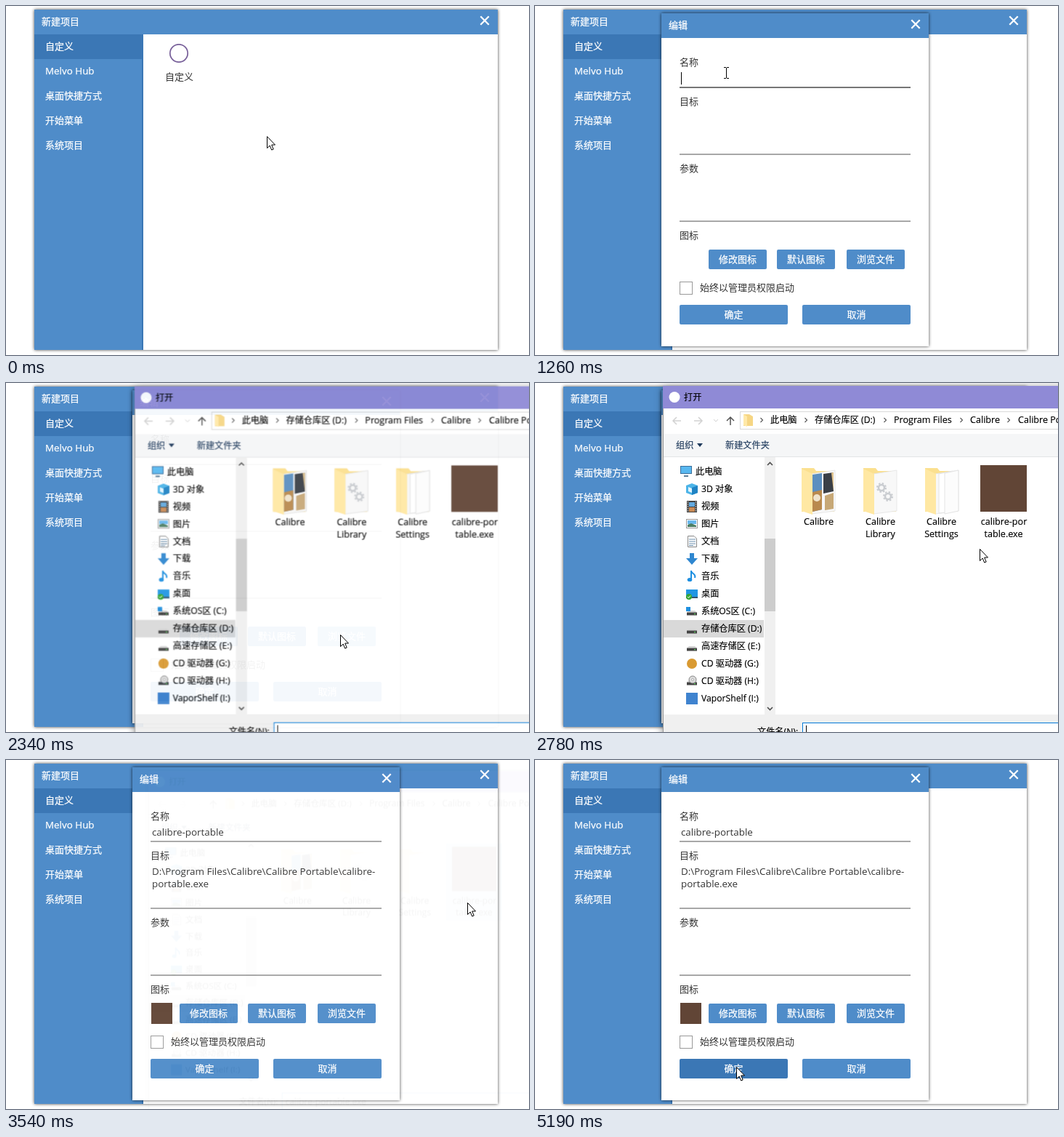
These frames come from a looping animation (720x480 px, 5290 ms). An HTML page:

```html
<!DOCTYPE html>
<html lang="zh-CN">
<head>
<meta charset="utf-8">
<title>新建项目</title>
<style>
html, body { margin: 0; width: 100%; height: 100%; overflow: hidden; background: #fff; }
svg { display: block; width: 720px; height: 480px; }
text { font: 13px "Open Sans", "Noto Sans CJK SC", "Noto Sans CJK", sans-serif; fill: #333; white-space: pre; }
.en { font-size: 13.4px; }
.light text, text.light { fill: #fff; stroke: #fff; stroke-width: .25px; }
.mid text, text.mid { text-anchor: middle; }
.win { fill: #fff; filter: drop-shadow(0 0 2px rgba(0,0,0,.75)); }
.blue { fill: #4f8cc9; }
.dark { fill: #3b77b5; }
.line { fill: #a8a8a8; }
.x { stroke: #fff; stroke-width: 2.3; fill: none; }

#picker text { font-size: 12.2px; fill: #000; stroke: #000; stroke-width: .15px; }
#picker .en { font-size: 12.6px; }
#picker .cmd { fill: #1e395b; stroke: #1e395b; }
.frame { fill: #fff; filter: drop-shadow(0 2px 6px rgba(0,0,0,.45)); }
.chev { fill: none; stroke: #555; stroke-width: 1.1; }

/* 5290 ms loop, every change is a hard step */
.a { animation: 5290ms step-end infinite; }
#cursor { animation-name: move; }
#arrow { animation-name: arrow; }
#beam { animation-name: beam; }
#tile { animation-name: tile; }
#edit { animation-name: edit; }
#caret { animation-name: caret; }
#lineName { animation-name: lineName; }
#lineGoal { animation-name: lineGoal; }
#lineArgs { animation-name: lineArgs; }
#browse { animation-name: browse; }
#reset { animation-name: reset; }
#ok { animation-name: ok; }
#filled { animation-name: filled; }
#picker { animation-name: picker; transform-origin: 633px 253px; }
#pick { animation-name: pick; }
#fileName { animation-name: fileName; }
#fileCaret { animation-name: fileCaret; }

@keyframes move {
  0% { transform: translate(359px,179px); }
  5.25% { transform: translate(350px,169px); }
  7.33% { transform: translate(318px,140px); }
  9.22% { transform: translate(285px,110px); }
  11.3% { transform: translate(268px,96px); }
  13.38% { transform: translate(263px,92px); }
  25.67% { transform: translate(268px,104px); }
  27.75% { transform: translate(305px,165px); }
  29.83% { transform: translate(362px,240px); }
  31.9% { transform: translate(420px,322px); }
  33.8% { transform: translate(445px,338px); }
  35.88% { transform: translate(455px,344px); }
  37.96% { transform: translate(459px,346px); }
  40.03% { transform: translate(460px,346px); }
  48.35% { transform: translate(490px,322px); }
  50.43% { transform: translate(560px,270px); }
  52.51% { transform: translate(612px,228px); }
  54.78% { transform: translate(630px,204px); }
  57.05% { transform: translate(635px,196px); }
  75.2% { transform: translate(596px,226px); }
  77.27% { transform: translate(505px,284px); }
  79.35% { transform: translate(440px,325px); }
  81.43% { transform: translate(398px,352px); }
  83.51% { transform: translate(366px,388px); }
  85.59% { transform: translate(322px,404px); }
  87.67% { transform: translate(290px,416px); }
  89.56%, 100% { transform: translate(277px,422px); }
}
@keyframes arrow {
  0%, 31.9%, 79.35%, 100% { opacity: 1; }
  17.35%, 77.27% { opacity: 0; }
}
@keyframes beam {
  0%, 31.9%, 79.35%, 100% { opacity: 0; }
  17.35%, 77.27% { opacity: 1; }
}
@keyframes tile { 0%, 100% { opacity: 0; } 9.22% { opacity: 1; } }
@keyframes edit { 0% { opacity: 0; } 15.27% { opacity: .6; } 17.35%, 100% { opacity: 1; } }
@keyframes caret { 0%, 33.8%, 100% { opacity: 0; } 23.78% { opacity: 1; } }
@keyframes lineName { 0%, 27.75%, 100% { fill: #a8a8a8; } 17.35% { fill: #767676; } }
@keyframes lineGoal { 0%, 29.83%, 100% { fill: #a8a8a8; } 27.75% { fill: #767676; } }
@keyframes lineArgs { 0%, 31.9%, 79.35%, 100% { fill: #a8a8a8; } 29.83%, 77.27% { fill: #767676; } }
@keyframes browse { 0%, 65.18%, 100% { fill: #4f8cc9; } 33.8% { fill: #62a0df; } }
@keyframes reset { 0%, 85.59%, 100% { fill: #4f8cc9; } 81.43% { fill: #62a0df; } 83.51% { fill: #5996d4; } }
@keyframes ok { 0% { fill: #4f8cc9; } 87.67% { fill: #62a0df; } 98.07%, 100% { fill: #3b77b5; } }
@keyframes filled { 0% { opacity: 0; } 65.18%, 100% { opacity: 1; } }
@keyframes picker {
  0%, 69.15%, 100% { opacity: 0; transform: scale(.955); }
  41.92% { opacity: .5; transform: scale(.96); }
  44.2% { opacity: .945; transform: scale(.998); }
  46.46% { opacity: 1; transform: none; }
  65.18% { opacity: .6; transform: scale(.985); }
  66.88% { opacity: .04; transform: scale(.9555); }
}
@keyframes pick {
  0% { fill: transparent; stroke: transparent; }
  54.78% { fill: #e5f3ff; stroke: #e5f3ff; }
  61.02%, 100% { fill: #cce8ff; stroke: #99d1ff; }
}
@keyframes fileName { 0% { opacity: 0; } 61.02%, 100% { opacity: 1; } }
@keyframes fileCaret { 0% { opacity: 1; } 61.02%, 100% { opacity: 0; } }
</style>
</head>
<body>
<svg viewBox="0 0 720 480">
  <defs>
    <g id="folder">
      <path d="M0 1H17L20 5H45V61H0Z" fill="#fbe08f"/>
      <path d="M14 9L46 4V60L14 64Z" fill="#f8f8f8" stroke="#e2e2e2" stroke-width=".8"/>
    </g>
    <path id="flap" d="M0 2L15 9V65L0 60Z" fill="#ffe8a3"/>
    <g id="drive">
      <path d="M3 7H11L14 9.500H0Z" fill="#d4d4d4"/>
      <rect y="9.500" width="14" height="4" fill="#444"/>
      <rect x="10" y="11" width="2" height="1.200" fill="#5fd35f"/>
    </g>
    <path id="chev" class="chev" d="M-1.500 -3L1.500 0L-1.500 3"/>
    <path id="cross" class="x" d="M-5.700 -5.700L5.700 5.700M5.700 -5.700L-5.700 5.700"/>
  </defs>

  <!-- main window -->
  <rect class="win" x="39" y="5" width="638" height="468"/>
  <rect class="blue" x="39" y="5" width="638" height="34"/>
  <rect class="blue" x="39" y="39" width="148" height="434"/>
  <rect class="dark" x="187" y="39" width="2" height="434"/>
  <rect class="dark" x="39" y="39" width="150" height="34"/>
  <use href="#cross" x="659" y="20"/>
  <g class="light">
    <text x="49" y="25.500">新建项目</text>
    <text x="54" y="60">自定义</text>
    <text x="54" y="94" class="en">Melvo Hub</text>
    <text x="54" y="128">桌面快捷方式</text>
    <text x="54" y="162">开始菜单</text>
    <text x="54" y="196">系统项目</text>
  </g>
  <rect id="tile" class="a" x="189" y="39" width="98" height="74" fill="#e5eef7"/>
  <circle cx="238" cy="65" r="12.200" fill="#fff" stroke="#775f99" stroke-width="1.700"/>
  <text class="mid" x="238.500" y="102">自定义</text>

  <!-- edit dialog -->
  <g id="edit" class="a">
    <rect class="win" x="174" y="10" width="368" height="458"/>
    <rect class="blue" x="174" y="10" width="368" height="34"/>
    <text class="light" x="184" y="30.500">编辑</text>
    <use href="#cross" x="524" y="25"/>
    <text x="199" y="82">名称</text>
    <text x="199" y="136">目标</text>
    <text x="199" y="228">参数</text>
    <text x="199" y="320">图标</text>
    <rect id="lineName" class="line a" x="199" y="111" width="318" height="2"/>
    <rect id="lineGoal" class="line a" x="199" y="203" width="318" height="2"/>
    <rect id="lineArgs" class="line a" x="199" y="295" width="318" height="2"/>
    <rect id="caret" class="a" x="201" y="91" width="1" height="17"/>
    <g id="filled" class="a">
      <text class="en" x="201" y="104">calibre-portable</text>
      <text class="en" x="201" y="158">D:\Program Files\Calibre\Calibre Portable\calibre-</text>
      <text class="en" x="201" y="175">portable.exe</text>
      <rect x="200" y="334" width="29" height="29" fill="#614536"/>
    </g>
    <g class="blue">
      <rect x="239" y="335" width="80" height="27" rx="2"/>
      <rect id="reset" class="a" x="333" y="335" width="80" height="27" rx="2"/>
      <rect id="browse" class="a" x="429" y="335" width="80" height="27" rx="2"/>
      <rect id="ok" class="a" x="199" y="411" width="149" height="27" rx="2"/>
      <rect x="368" y="411" width="149" height="27" rx="2"/>
    </g>
    <g class="light mid">
      <text x="279" y="353">修改图标</text>
      <text x="373" y="353">默认图标</text>
      <text x="469" y="353">浏览文件</text>
      <text x="273.500" y="429">确定</text>
      <text x="442.500" y="429">取消</text>
    </g>
    <rect x="199.500" y="379.500" width="17" height="17" fill="#fff" stroke="#999"/>
    <text x="227" y="392">始终以管理员权限启动</text>
  </g>

  <!-- file picker -->
  <g id="picker" class="a">
    <rect class="frame" x="176" y="4" width="914" height="498"/>
    <rect x="176" y="4" width="914" height="31" fill="#8f8ad6"/>
    <circle cx="192" cy="19.500" r="7.500" fill="#fff"/>
    <text x="205" y="24">打开</text>

    <g fill="none" stroke="#d2d2d2" stroke-width="1.500">
      <path d="M201 52H190M195 47L190 52L195 57M219 52H230M225 47L230 52L225 57"/>
      <path d="M246 50L249 53L252 50" stroke-width="1"/>
      <path d="M269 58V47M264 52L269 47L274 52" stroke="#555"/>
    </g>
    <rect x="282.500" y="39.500" width="640" height="24" fill="#fff" stroke="#d9d9d9"/>
    <path d="M287 43H295L300 46V59H287Z" fill="#f6d684"/>
    <path d="M287 43L292 46V60L287 58Z" fill="#ffe9a8"/>
    <use href="#chev" x="312" y="51"/>
    <use href="#chev" x="373" y="51"/>
    <use href="#chev" x="482" y="51"/>
    <use href="#chev" x="587" y="51"/>
    <use href="#chev" x="652" y="51"/>
    <text x="324" y="55">此电脑</text>
    <text x="385" y="55">存储仓库区 (D:)</text>
    <text x="494" y="55" class="en">Program Files</text>
    <text x="599" y="55" class="en">Calibre</text>
    <text x="665" y="55" class="en">Calibre Portable</text>

    <rect x="176" y="70" width="914" height="31" fill="#f5f6f7"/>
    <rect x="176" y="101" width="914" height="1" fill="#e3e4e6"/>
    <text x="194" y="90" class="cmd">组织</text>
    <path d="M223 83H231L227 88Z" fill="#1e395b"/>
    <text x="262" y="90" class="cmd">新建文件夹</text>

    <rect x="176" y="326" width="139" height="24" fill="#d9d9d9"/>
    <rect x="316" y="102" width="15" height="354" fill="#f0f0f0"/>
    <rect x="316" y="214" width="15" height="100" fill="#cdcdcd"/>
    <path d="M320 113L323.500 109.500L327 113M320 446L323.500 449.500L327 446" fill="none" stroke="#505050" stroke-width="1.600"/>

    <!-- tree icons -->
    <rect x="200.500" y="114.500" width="15" height="10" fill="#58b8f0" stroke="#3b6f9c"/>
    <path d="M205 127H211V129H205Z" fill="#5d7f99"/>
    <path d="M208 141L216 138L224 141V151L216 154L208 151Z" fill="#4cb4e8"/>
    <path d="M216 144L224 141V151L216 154Z" fill="#1f83c4"/>
    <path d="M211 143L216 145V151L211 149Z" fill="#e3f5ff"/>
    <rect x="209" y="162" width="14" height="16" fill="#444"/>
    <path d="M210.500 163V178M221.500 163V178" stroke="#ddd" stroke-dasharray="1.500 1.500"/>
    <rect x="212" y="164" width="8" height="6" fill="#62a9df"/>
    <rect x="212" y="171" width="8" height="6" fill="#c98a55"/>
    <rect x="208.500" y="187.500" width="15" height="12" fill="#fff" stroke="#999"/>
    <rect x="210" y="189" width="12" height="5" fill="#69b7ec"/>
    <path d="M210 198V195L215 193L222 196V198Z" fill="#4d7f64"/>
    <path d="M210.500 210.500H219L222.500 214V225.500H210.500Z" fill="#fff" stroke="#888"/>
    <path d="M212 215H221M212 218H221M212 221H221M212 223.500H218" stroke="#6b8fae"/>
    <path d="M213 234H219V241H224L216 250L208 241H213Z" fill="#2f87d0"/>
    <path d="M215 258V270M215 259C217 263 222 263 220 268" stroke="#1d8fe0" stroke-width="2" fill="none"/>
    <ellipse cx="213" cy="270.500" rx="3.300" ry="2.600" fill="#1d8fe0"/>
    <rect x="208" y="284" width="16" height="12" fill="#2196e3"/>
    <rect x="208" y="294" width="16" height="2" fill="#33546e"/>
    <circle cx="212" cy="294" r="4" fill="#37a637"/>
    <path d="M210 294L211.500 295.500L214 292.500" stroke="#fff" fill="none"/>
    <use href="#drive" x="209" y="306"/>
    <rect x="208" y="308" width="6" height="6" fill="#1e90e0"/>
    <use href="#drive" x="209" y="331"/>
    <use href="#drive" x="209" y="355"/>
    <circle cx="216" cy="386" r="7" fill="#d99a32"/>
    <use href="#drive" x="209" y="402"/>
    <circle cx="217" cy="408" r="5" fill="#dcdcdc" stroke="#888"/>
    <circle cx="217" cy="408" r="1.500" fill="#fff" stroke="#999" stroke-width=".7"/>
    <rect x="208" y="426" width="16" height="16" fill="#3f83cf"/>

    <text x="221" y="126">此电脑</text>
    <text x="229" y="150">3D 对象</text>
    <text x="229" y="174">视频</text>
    <text x="229" y="198">图片</text>
    <text x="229" y="222">文档</text>
    <text x="229" y="246">下载</text>
    <text x="229" y="270">音乐</text>
    <text x="229" y="294">桌面</text>
    <text x="229" y="318">系统OS区 (C:)</text>
    <text x="229" y="342">存储仓库区 (D:)</text>
    <text x="229" y="366">高速存储区 (E:)</text>
    <text x="229" y="390">CD 驱动器 (G:)</text>
    <text x="229" y="414">CD 驱动器 (H:)</text>
    <text x="229" y="438">VaporShelf (I:)</text>

    <!-- files -->
    <use href="#folder" x="367" y="116"/>
    <path d="M382 126L395 124V174L382 177Z" fill="#5b8fc0"/>
    <path d="M382 150L395 147V174L382 177Z" fill="#b98a4e"/>
    <circle cx="388" cy="158" r="5" fill="#efe3cb"/>
    <path d="M397 125L411 123V149L397 152Z" fill="#3a3f47"/>
    <path d="M399 155L411 151V173L399 175Z" fill="#c7a877"/>
    <path d="M405 124L408 123.500L411 149V123L405 124Z" fill="#e3c58e"/>
    <use href="#flap" x="367" y="116"/>
    <use href="#folder" x="452" y="116"/>
    <g fill="none" stroke="#c9ccd0">
      <circle cx="477" cy="144" r="4" stroke-width="2.500"/>
      <circle cx="477" cy="144" r="6" stroke-width="2" stroke-dasharray="2.360 2.360"/>
      <circle cx="486" cy="156" r="4" stroke-width="2.500"/>
      <circle cx="486" cy="156" r="6" stroke-width="2" stroke-dasharray="2.360 2.360"/>
    </g>
    <use href="#flap" x="452" y="116"/>
    <use href="#folder" x="537" y="116"/>
    <path d="M556 125L575 121V177L556 179Z" fill="#fff" stroke="#e4e4e4"/>
    <path d="M564 124L583 120V176L564 180Z" fill="#fcfcfc" stroke="#e4e4e4"/>
    <use href="#flap" x="537" y="116"/>
    <rect id="pick" class="a" x="605.500" y="108.500" width="79" height="110"/>
    <rect x="613" y="113" width="64" height="64" fill="#614536"/>
    <g class="mid">
      <text class="en" x="390.500" y="195">Calibre</text>
      <text class="en" x="475.500" y="195">Calibre</text>
      <text class="en" x="475.500" y="212">Library</text>
      <text class="en" x="559.500" y="195">Calibre</text>
      <text class="en" x="559.500" y="212">Settings</text>
      <text class="en" x="645.500" y="195">calibre-por</text>
      <text class="en" x="645" y="212">table.exe</text>
    </g>

    <rect x="176" y="456" width="914" height="46" fill="#f0f0f0"/>
    <text x="306" y="484">文件名(N):</text>
    <rect x="368.500" y="467.500" width="500" height="24" fill="#fff" stroke="#0078d7"/>
    <rect id="fileCaret" class="a" x="373" y="471" width="1" height="16"/>
    <text id="fileName" class="en a" x="373" y="485">calibre-portable.exe</text>
    <path d="M176.500 35V502" stroke="#9a9a9a" stroke-width="1"/>
  </g>

  <!-- pointer -->
  <g id="cursor" class="a">
    <path id="arrow" class="a" d="M.5 .5V16.500L4.200 13L6.700 19L9.200 18L6.700 12H11.500Z" fill="#fff" stroke="#000"/>
    <path id="beam" class="a" d="M-3 -7.500H0M1 -7.500H4M.5 -7V7M-3 7.500H0M1 7.500H4" fill="none" stroke="#000"/>
  </g>
</svg>
</body>
</html>
```
